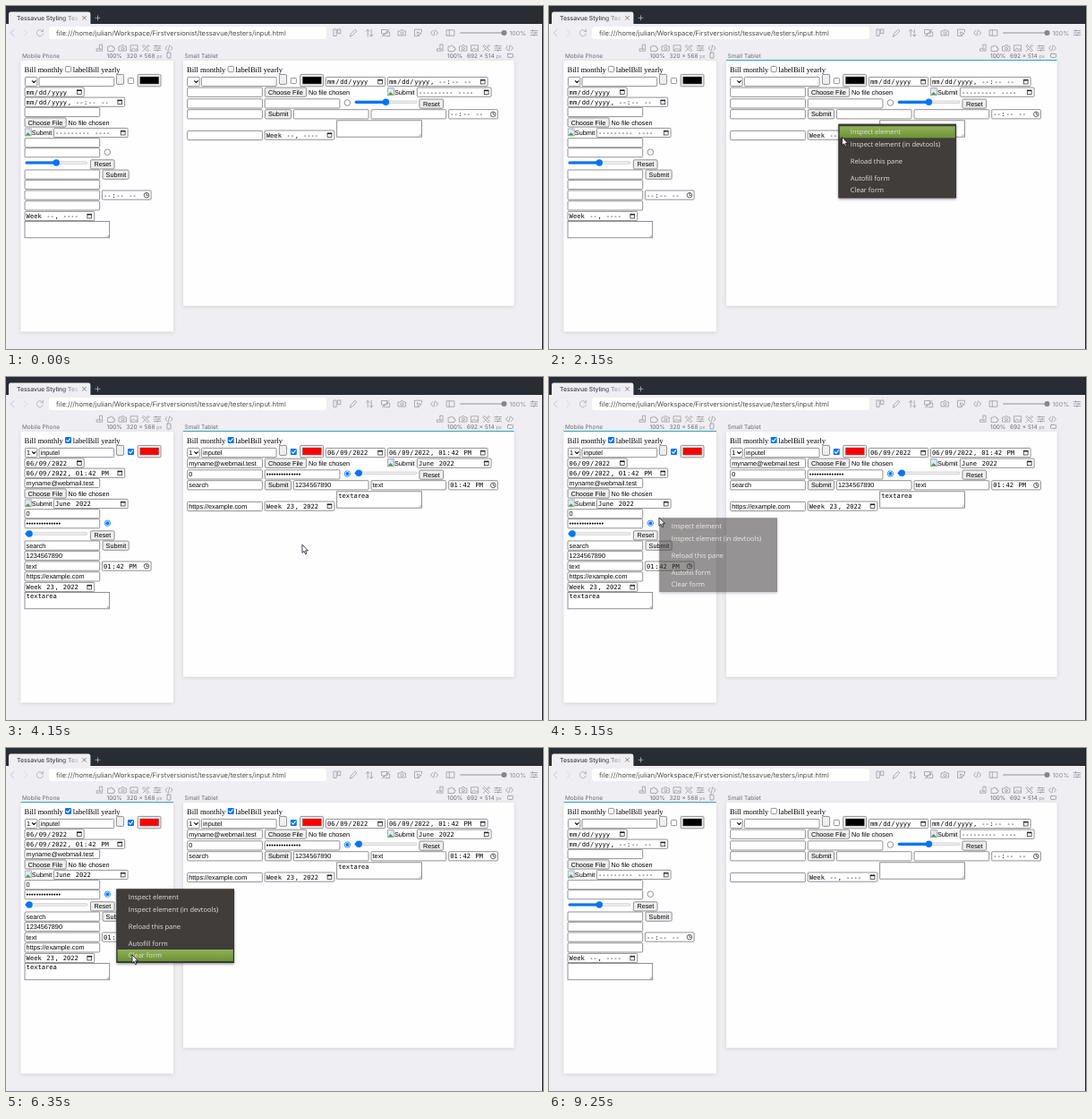
Recreate the animation shown at these times as an HTML page. Size 600 by 383 pixels, loop 9550 ms.

```html
<!DOCTYPE html>
<html lang="en">
<head>
<meta charset="utf-8">
<title>Form autofill</title>
<style>
html, body { margin: 0; width: 100%; height: 100%; overflow: hidden; background: #efeef3; }
svg { display: block; width: 600px; height: 383px; }
text { white-space: pre; text-rendering: geometricPrecision; }
.ui { font-family: Inter, sans-serif; }
.serif { font: 8.54px "Liberation Serif", serif; }
.sans { font: 7.25px "Liberation Sans", sans-serif; }
.mono { font: 7.12px "DejaVu Sans Mono", monospace; }
.menu { font: 7.5px "Open Sans", "Noto Sans", sans-serif; fill: #e4e2dc; }
.box { fill: #fff; stroke: #767676; stroke-width: .8; }
.btn { fill: #efefef; stroke: #767676; stroke-width: .8; }
.line { fill: none; stroke-width: .7; stroke-linecap: round; stroke-linejoin: round; }
.on, .filled .off { display: none; }
.filled .on { display: inline; }
</style>
</head>
<body>
<svg id="stage" viewBox="0 0 600 383" xmlns="http://www.w3.org/2000/svg"></svg>
<script>
const LOOP = 9550, STEP = 50;
const stage = document.getElementById('stage');

const rect = (x, y, w, h, attrs = '') =>
  `<rect x="${x}" y="${y}" width="${w}" height="${h}" ${attrs}/>`;
const circle = (x, y, r, attrs = '') => `<circle cx="${x}" cy="${y}" r="${r}" ${attrs}/>`;
const path = (d, attrs = '') => `<path d="${d}" ${attrs}/>`;
const text = (x, y, cls, s, attrs = '') =>
  `<text x="${x}" y="${y}" class="${cls}" ${attrs}>${s}</text>`;
const at = (x, y, body) => `<g transform="translate(${x} ${y})">${body}</g>`;
const either = (off, on) => `<g class="off">${off}</g><g class="on">${on}</g>`;

// ---- form controls, each drawn from its own top left corner
const box = (w, h = 11) => rect(.4, .4, w - .8, h - .8, 'class="box" rx="1"');
const input = (value, attrs = '') => box(84.5) + `<g class="on">${text(2, 8, 'sans', value, attrs)}</g>`;
const button = (label, w, x = 3) =>
  rect(.4, .4, w - .8, 10.2, 'class="btn" rx="1.4"') + text(x, 8, 'sans', label);

// date and time parts carry a little padding on both sides
const parts = (s) => `<text x="2" y="8" class="mono">` + s.split(/([\/,: ]+)/)
  .map((p, i) => `<tspan dx="${i ? .65 : 0}">${p}</tspan>`).join('') + '</text>';
const calendar = (x) => at(x, 2.6,
  rect(.4, .8, 4.8, 4.6, 'fill="none" stroke="#222" stroke-width=".7"') +
  path('M.2 1.3H5.4', 'stroke="#222" stroke-width="1.2"') +
  path('M1.4 0V1M4.2 0V1', 'stroke="#222" stroke-width=".6"'));
const clock = (x) => circle(x, 5.6, 2.8, 'fill="none" stroke="#222" stroke-width=".7"') +
  path(`M${x} 3.8V5.8H${x + 1.5}`, 'class="line" stroke="#222"');
const picker = (w, off, on, icon = calendar(w - 8.6)) => box(w) + either(parts(off), parts(on)) + icon;

const check = () => either(
  rect(.4, .4, 6.2, 6.2, 'class="box" rx="1"'),
  rect(0, 0, 7, 7, 'rx="1" fill="#0075ff"') +
  path('M1.5 3.6L3 5.1L5.6 1.9', 'class="line" stroke="#fff" style="stroke-width:1.1"'));

const slider = (pos) => rect(.3, -1.3, 69, 2.6, 'rx="1.3" fill="#efefef" stroke="#b2b2b2" stroke-width=".5"') +
  rect(0, -1.6, pos, 3.2, 'rx="1.6" fill="#0075ff"') + circle(pos, 0, 3.7, 'fill="#0075ff"');

const controls = {
  agree: check(),
  select: rect(.4, .4, 13.4, 10.2, 'class="box" rx="1"') +
    `<g class="on">${text(2, 8, 'sans', '1')}</g>` +
    path('M8.3 4.6L10.2 6.5L12.1 4.6', 'class="line" stroke="#111" style="stroke-width:1.1"'),
  name: input('inputel'),
  blank: rect(.4, .4, 8.2, 11, 'class="btn" rx="1.4"'),
  check: check(),
  color: rect(.4, .4, 25.8, 13.4, 'class="btn" rx="1.2"') +
    either(rect(3, 3, 21, 8), rect(3, 3, 21, 8, 'fill="#f00"')) +
    rect(3, 3, 21, 8, 'fill="none" stroke="#777" stroke-width=".5"'),
  date: picker(67, 'mm/dd/yyyy', '06/09/2022'),
  stamp: picker(112.5, 'mm/dd/yyyy, --:-- --', '06/09/2022, 01:42 PM'),
  email: input('myname@webmail.test'),
  file: button('Choose File', 47, 4) + text(49, 8, 'sans', 'No file chosen'),
  image: rect(.4, 1, 7, 8, 'fill="#dce9fa" stroke="#999" stroke-width=".7"') +
    path('M.8 8.6L3.6 5.2L7 8.6Z', 'fill="#4c9a3f"') + path('M4.6 1L7.6 4V1Z', 'fill="#fff" stroke="#999" stroke-width=".5"') +
    text(8, 8, 'sans', 'Submit'),
  month: picker(83.5, '--------- ----', 'June 2022'),
  number: input('0'),
  secret: input('•'.repeat(14), 'letter-spacing=".22"'),
  radio: either(circle(0, 0, 3.3, 'class="box"'),
    circle(0, 0, 3.2, 'fill="#fff" stroke="#0075ff" stroke-width=".8"') + circle(0, 0, 2, 'fill="#0075ff"')),
  range: either(slider(34.7), slider(4.5)),
  reset: button('Reset', 27.5, 4.4),
  search: input('search'),
  submit: button('Submit', 30, 4),
  phone: input('1234567890'),
  words: input('text'),
  time: picker(55.5, '--:-- --', '01:42 PM', clock(50)),
  url: input('https://example.com'),
  week: picker(78.5, 'Week --, ----', 'Week 23, 2022'),
  area: rect(.4, .4, 94.7, 18.4, 'class="box"') +
    path('M92 18L94.6 15.4M93.6 18L94.6 17', 'stroke="#777" stroke-width=".6"') +
    `<g class="on">${text(2, 7.3, 'mono', 'textarea')}</g>`
};

const phoneLayout = {
  agree: [66, 67], select: [21, 79], name: [36.6, 79], blank: [123, 76], check: [136, 80], color: [146.8, 76],
  date: [20.6, 90.5], stamp: [20.6, 101.7], email: [20.6, 113], file: [20.6, 124.5], image: [20.8, 136],
  month: [53, 136], number: [20.6, 147.2], secret: [20.6, 158.2], radio: [113.4, 163.2], range: [21.5, 175],
  reset: [94, 171.4], search: [20.6, 182.6], submit: [107.6, 182.7], phone: [20.6, 194], words: [20.6, 205.6],
  time: [107, 205.6], url: [20.6, 217.4], week: [20.6, 229], area: [20.6, 240]
};
const tabletLayout = {
  agree: [247.7, 67], select: [202.3, 79], name: [218, 79], blank: [305, 76], check: [317.8, 80], color: [328.3, 76],
  date: [357, 79], stamp: [426, 79], email: [202.3, 90.7], file: [289, 90.7], image: [426, 90.7],
  month: [459, 90.7], number: [202.3, 103.4], secret: [288.8, 103.4], radio: [381.4, 108], range: [389.7, 107.3],
  reset: [461.5, 103.6], search: [202.3, 115.3], submit: [289, 115.3], phone: [321, 115.3], words: [407.6, 115.3],
  time: [494.3, 115.3], url: [202.3, 139], week: [288.8, 138.6], area: [369.3, 127.4]
};

// ---- line icons, centred on their own origin
const icon = (x, y, d, color = '#909097') => at(x, y, path(d, `class="line" stroke="${color}"`));
const CODE = 'M-2 -2.5L-4 0L-2 2.5M2 -2.5L4 0L2 2.5M.7 -3.2L-.7 3.2';
const CAMERA = 'M-4 -2H-2L-1 -3.3H1L2 -2H4V3H-4ZM1.5 .4A1.5 1.5 0 1 1 -1.5 .4A1.5 1.5 0 1 1 1.5 .4';
const SLIDERS = 'M-3.8 -2.5H3.8M-3.8 0H3.8M-3.8 2.5H3.8M-1.5 -3.3V-1.7M1.8 -.8V.8M0 1.7V3.3';
const paneIcons = [
  'M3 -3.5V3.2H-3.6V.8H-.2V-3.5ZM1.2 .5V1.6H0',
  'M-3.5 -1.8H-1.4A1.2 1.2 0 1 1 1 -1.8H2.6V0A1.2 1.2 0 1 1 2.6 2.2V3.6H-3.5Z',
  CAMERA,
  'M-3.8 -3.2H3.8V3.2H-3.8ZM-3.5 2.8L-1 -.2L1 1.8L2.2 .6L3.6 2.4',
  'M-3.6 -2.4L-2.4 -3.6L3.6 2.4L2.4 3.6ZM3.6 -2.6L2.6 -3.6L.7 -1.7M-.9 .9L-3.4 3.4M1.7 -.7L3.6 -2.6',
  SLIDERS,
  CODE
];
const toolIcons = [
  'M-3.7 -4H-.8V3.4H-3.7ZM1 -4H3.8V.6H1Z',
  'M-3.6 3.8L-2.8 1L2 -3.8L3.8 -2L-1 2.8Z',
  'M-2 4V-3.5M-3.8 -1.7L-2 -3.7L-.2 -1.7M2 -3.7V3.8M.2 2L2 4L3.8 2',
  'M-4.4 -3.5H1.6V1H-4.4ZM-.4 3.6H4.4V-1H2M-2 1V3.6M-4 4L4 -4',
  CAMERA,
  'M4 -1V-3.8H-4V3.4H-.5M-1 -1L3.6 .7L1.5 1.5L.7 3.5Z',
  CODE,
  'M-4.2 -3.2H4.2V3.2H-4.2ZM-1.4 -3.2V3.2'
];

function pane(x, w, h, title, size, layout) {
  const right = x + w - 5, grey = 'font-size="6.5" fill="#6c6c74"';
  return paneIcons.map((d, i) => icon(right - 12.9 * (6 - i), 47, d)).join('') +
    text(x + 1.5, 57.6, 'ui', title, grey) +
    text(right - 69.5, 57.6, 'ui', '100%', grey) +
    text(right - 47.5, 57.6, 'ui', size + ' <tspan font-size="5.6" fill="#999">px</tspan>', grey) +
    rect(right - 2, w > 200 ? 53.4 : 52, w > 200 ? 6 : 4, w > 200 ? 4 : 6, 'class="line" stroke="#85858d" rx=".8"') +
    rect(x, 61, w, h, 'fill="#fefdff" filter="url(#soft)"') +
    text(x + 4, 74, 'serif', 'Bill monthly') + text(x + 58.3, 74, 'serif', 'labelBill yearly') +
    Object.keys(layout).map((k) => at(...layout[k], controls[k])).join('');
}

const browser =
  rect(0, 0, 600, 383, 'fill="#efeef3"') +
  rect(0, 0, 600, 20, 'fill="#292c32"') +
  rect(599, 0, 1, 383, 'fill="#1d1f24"') +
  path('M3 20V9Q3 6.6 5.4 6.6H92Q94.4 6.6 94.4 9V20Z', 'fill="#efeef3"') +
  text(12, 15.8, 'ui', 'Tessavue Styling Tes', 'font-size="6.8" font-weight="500" fill="url(#fade)"') +
  icon(87.5, 13.3, 'M-2 -2L2 2M2 -2L-2 2', '#55555c') + icon(102.5, 13.3, 'M-2.5 0H2.5M0 -2.5V2.5', '#c3c5cb') +
  icon(7, 30, 'M2 -3.6L-1.8 0L2 3.6', '#b4b4bb') + icon(22, 30, 'M-2 -3.6L1.8 0L-2 3.6', '#cfcfd5') +
  icon(38, 30, 'M3.2 -1.6A3.6 3.6 0 1 0 3.5 1M3.5 -3.8V-1.4H1.1', '#a4a4ab') +
  rect(48, 23, 310, 14, 'rx="3" fill="#fff"') +
  text(56, 32.6, 'ui', 'file:///home/julian/Workspace/Firstversionist/tessavue/testers/input.html', 'font-size="7.5" fill="#4c4c53"') +
  toolIcons.map((d, i) => icon(370 + 18.1 * i, 30, d)).join('') +
  rect(507, 29.2, 50, 1.6, 'rx=".8" fill="#b0b0b6"') + circle(556.5, 30, 3, 'fill="#85858d"') +
  text(562.5, 32.6, 'ui', '100%', 'font-size="7" fill="#909097"') +
  icon(590, 30, SLIDERS);

// ---- context menu
const items = [[9, 'Inspect element'], [22.5, 'Inspect element (in devtools)'],
  [41.5, 'Reload this pane'], [60.5, 'Autofill form'], [74, 'Clear form']];
const menuBody = rect(0, 0, 131.5, 82.5, 'fill="#3f3e3a" filter="url(#drop)"') +
  rect(.3, .3, 130.9, 81.9, 'fill="none" stroke="#32312d" stroke-width=".6"') +
  rect(1.2, 0, 129.1, 13, 'id="hover" fill="url(#green)"') +
  items.map(([y, s]) => text(13.3, y + 2.6, 'menu', s)).join('');

const stop = (at, color, alpha = 1) => `<stop offset="${at}" stop-color="${color}" stop-opacity="${alpha}"/>`;
stage.innerHTML = `<defs>
  <linearGradient id="fade" gradientUnits="userSpaceOnUse" x1="62" x2="82">${stop(0, '#3c3c44')}${stop(1, '#3c3c44', .1)}</linearGradient>
  <linearGradient id="green" x2="0" y2="1">${stop(0, '#8fb254')}${stop(1, '#6c9236')}</linearGradient>
  <filter id="soft" x="-10%" y="-10%" width="120%" height="120%"><feDropShadow dx="0" dy="1" stdDeviation="2" flood-opacity=".13"/></filter>
  <filter id="drop" x="-10%" y="-10%" width="120%" height="125%"><feDropShadow dx="0" dy="1.2" stdDeviation="1.6" flood-opacity=".45"/></filter>
  </defs>` + browser +
  pane(16.5, 170.5, 302.5, 'Mobile Phone', '320 × 568', phoneLayout) +
  pane(198, 369.5, 273.7, 'Small Tablet', '692 × 514', tabletLayout) +
  rect(0, 60, 0, 1.2, 'id="focus" fill="#41abc2"') +
  `<g id="menu">${menuBody}</g>` +
  path('M0 0V9.2L2.1 7.3L3.6 10.6L5 10L3.6 6.8H6.4Z',
    'id="cursor" fill="#fff" stroke="#111" stroke-width=".8" stroke-linejoin="round"');

const [focusBar, menu, hover, cursor] = ['focus', 'menu', 'hover', 'cursor'].map((id) => document.getElementById(id));

// ---- timeline
const route = [[0, 612, 165], [1000, 337, 146], [1350, 323, 131], [1900, 323, 131], [2150, 327.5, 146.5],
  [2600, 337, 188], [4100, 337, 188], [4600, 122, 157], [4800, 123, 157], [5400, 123, 157], [5800, 130, 211],
  [6100, 131, 211.3], [6350, 141, 231], [7650, 141, 231], [8600, 480, 122], [9100, 612, 80], [LOOP, 612, 80]];
const menus = [{ x: 323.5, y: 131.8, open: 1450, close: 2950 }, { x: 123.5, y: 157.5, open: 5150, close: 6650 }];

const clamp = (v) => Math.max(0, Math.min(1, v));
function along(t) {
  const i = route.findIndex((p) => p[0] > t);
  const [t0, x0, y0] = route[i - 1], [t1, x1, y1] = route[i];
  const u = (t - t0) / (t1 - t0), e = u * u * (3 - 2 * u);
  return [x0 + (x1 - x0) * e, y0 + (y1 - y0) * e];
}

function draw(t) {
  const [x, y] = along(t);
  cursor.setAttribute('transform', `translate(${x} ${y})`);
  stage.classList.toggle('filled', t >= 2900 && t < 6650);

  const [first, second] = menus;
  focusBar.setAttribute('x', t < second.open ? 198 : 16.5);
  focusBar.setAttribute('width', t < first.open ? 0 : t < second.open ? 369.5 : 170.5);

  const m = t < second.open ? first : second;
  const shown = t < m.open ? 0 : clamp(.55 + (t - m.open) / 220) * clamp(1 - (t - m.close) / 220);
  menu.setAttribute('opacity', shown);
  menu.setAttribute('transform', `translate(${m.x} ${m.y})`);
  const item = items.find(([c]) => Math.abs(y - m.y - c) < 6.5);
  hover.setAttribute('visibility', item ? 'visible' : 'hidden');
  if (item) hover.setAttribute('y', item[0] - 6.5);
}

const start = performance.now();
function tick() {
  const t = (performance.now() - start) % LOOP;
  draw(Math.floor(t / STEP) * STEP);
  requestAnimationFrame(tick);
}
tick();
</script>
</body>
</html>
```
